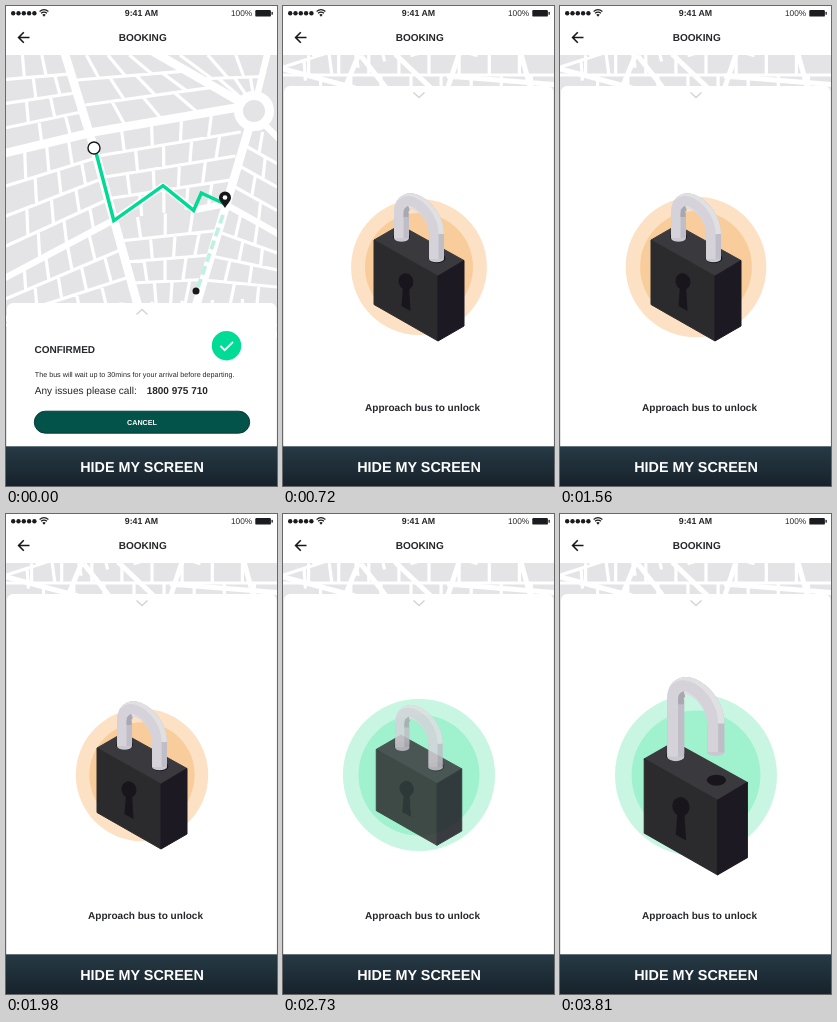
Recreate the animation shown at these times as an HTML page. Size 271 px wide and 480 px high, loop 3840 ms.

```html
<!DOCTYPE html>
<html lang="en">
<head>
<meta charset="utf-8">
<title>Booking unlock</title>
<style>
  html, body { margin: 0; width: 100%; height: 100%; overflow: hidden; background: #fff; }
  svg { display: block; width: 100vw; height: 100vh; }
  text { font-family: "Liberation Sans", Arial, sans-serif; fill: #26272b; text-rendering: geometricPrecision; }
  .b { font-weight: 700; }
  .mid { text-anchor: middle; }
  .road { fill: none; stroke: #fff; stroke-linejoin: round; }
</style>
</head>
<body>
<svg viewBox="0 0 271 480" preserveAspectRatio="none">
  <defs>
    <linearGradient id="bar" x2="0" y2="1">
      <stop stop-color="#263a45"/><stop offset="1" stop-color="#17222b"/>
    </linearGradient>
    <clipPath id="stage"><rect y="49" width="271" height="392"/></clipPath>
  </defs>
  <rect width="271" height="480" fill="#fff"/>

  <g clip-path="url(#stage)">
    <rect y="49" width="271" height="392" fill="#e4e4e7"/>
    <g id="map">
      <path id="streets" class="road" stroke-width="3.2"/>
      <path class="road" stroke-width="8.5" d="M58 45L88 142 108 214 132 300M-5 148L88 126 234 101M146 45L238 98M243 122L190 300"/>
      <path class="road" stroke-width="6.5" d="M262 45L251 90M258 118L276 136M108 214L-5 274M108 214L157 180 188 204 219 198 276 230"/>
      <circle cx="248" cy="105" r="15.5" fill="#e4e4e7" stroke="#fff" stroke-width="9"/>
      <path class="road" stroke-width="5" d="M-3 312L72 332M76 298L62 332M78 300L104 333M112 298L150 334M176 298L164 334M164 320L276 329M238 298L248 334"/>
      <path d="M217 209L191 284" fill="none" stroke="#bdf2de" stroke-width="3.8" stroke-dasharray="9 4.5"/>
      <path d="M88.8 142L107.8 214.6 157 179.6 187.6 204.4 195.3 187 219 198" fill="none" stroke="#00da95" stroke-width="3.5"/>
      <circle cx="88" cy="142" r="6" fill="#fff" stroke="#17181b" stroke-width="1.4"/>
      <circle cx="190" cy="285" r="3.5" fill="#17181b"/>
      <path d="M219 202C216 197 213 195 213 191.5A6 6 0 0 1 225 191.5C225 195 222 197 219 202Z" fill="#17181b"/>
      <circle cx="219" cy="191.5" r="2.3" fill="#fff"/>
    </g>

    <g id="sheet">
      <rect x="1" width="269.5" height="620" rx="6" fill="#fff"/>
      <path id="chevron" fill="none" stroke="#d5d5d8" stroke-width="1.6"/>
      <g id="details">
        <text class="b" x="28.5" y="50" font-size="10">CONFIRMED</text>
        <circle cx="220.5" cy="42.7" r="14.7" fill="#00dc96"/>
        <path d="M214.5 43L218.7 47.2 227 38.9" fill="none" stroke="#fff" stroke-width="1.9"/>
        <text x="28.8" y="74.3" font-size="7.18">The bus will wait up to 30mins for your arrival before departing.</text>
        <text x="28.8" y="91" font-size="10.08">Any issues please call:</text>
        <text class="b" x="140.7" y="91" font-size="10">1800 975 710</text>
        <rect x="28.3" y="108.2" width="215.4" height="22" rx="11" fill="#04534b" stroke="#03332f" stroke-width=".9"/>
        <text class="b mid" x="136" y="121.8" font-size="7.2" style="fill:#fff">CANCEL</text>
      </g>
    </g>

    <g id="content">
      <circle id="outer" cx="136" cy="261"/>
      <circle id="inner" cx="136" cy="261"/>
      <g id="lock">
        <g id="body">
          <g stroke-width="1" stroke-linejoin="round">
            <path d="M91 234L117 219 181 254.5 155 270Z" fill="#3a393d" stroke="#3a393d"/>
            <path d="M91 234L155 270V335L91 298.5Z" fill="#2b2b2d" stroke="#2b2b2d"/>
            <path d="M155 270L181 254.5V320L155 335Z" fill="#1d1922" stroke="#1d1922"/>
          </g>
          <g fill="#18161c">
            <ellipse cx="118.5" cy="231" rx="8.4" ry="4.8"/>
            <ellipse cx="154" cy="252.4" rx="8.4" ry="4.8"/>
            <path d="M120 280L118.5 300 127.5 305 126 280Z"/>
            <ellipse cx="123" cy="275.5" rx="7.4" ry="8.4" transform="rotate(-18 123 275.5)"/>
          </g>
        </g>
        <g id="shackle" fill="none">
          <ellipse cx="118.5" cy="232" rx="7.5" ry="3.8" fill="#c9c7d0"/>
          <ellipse id="foot" cx="153.5" rx="7.5" ry="3.2" fill="#c9c7d0"/>
          <path id="legs" stroke="#bfbdc7" stroke-width="15"/>
          <path id="arch" stroke="#e0dfe2" stroke-width="15"/>
          <path id="face" stroke="#d5d3d9" stroke-width="9.5" transform="translate(-2.7 0)"/>
          <path id="patch" stroke="#a9a7b0" stroke-width="5"/>
        </g>
      </g>
      <text class="b mid" x="139.5" y="404.6" font-size="10.05">Approach bus to unlock</text>
    </g>
  </g>

  <g fill="#1b1c1f">
    <g id="dots"></g>
    <path d="M38 10.8L36.3 8.7Q38 7.4 39.7 8.7Z"/>
    <path d="M35 7.2Q38 4.9 41 7.2M33.6 5.5Q38 1.9 42.4 5.5" fill="none" stroke="#1b1c1f" stroke-width="1.2"/>
    <rect x="249.3" y="4" width="15.6" height="6.6" rx="1.2"/>
    <rect x="265.5" y="5.8" width="1.3" height="3" rx=".6"/>
  </g>
  <text class="b mid" x="135.5" y="10.4" font-size="8.8">9:41 AM</text>
  <text x="225" y="10.4" font-size="8.3">100%</text>
  <path d="M23.5 31.5H12.8M17.8 26.3L12.6 31.5 17.8 36.7" fill="none" stroke="#17181b" stroke-width="1.6"/>
  <text class="b mid" x="136.7" y="34.5" font-size="10.05">BOOKING</text>

  <rect y="440.3" width="271" height="39.7" fill="url(#bar)"/>
  <text class="b mid" x="136" y="465.5" font-size="14.4" style="fill:#fff">HIDE MY SCREEN</text>
</svg>
<script>
const LOOP = 3840, PULSE = 1318;
const $ = id => document.getElementById(id);
const set = (id, attrs) => {
  for (const k in attrs) $(id).setAttribute(k, attrs[k]);
};
const lerp = (a, b, p) => a + (b - a) * p;
const ramp = (t, a, b) => Math.min(1, Math.max(0, (t - a) / (b - a)));
const smooth = p => p * p * (3 - 2 * p);
const ease = (t, a, b) => smooth(ramp(t, a, b));
const back = p => 1 + 2.2 * (p - 1) ** 3 + 1.2 * (p - 1) ** 2;
const mix = (a, b, p) => `rgb(${a.map((v, i) => Math.round(lerp(v, b[i], p)))})`;

$("dots").innerHTML = [0, 1, 2, 3, 4]
  .map(i => `<circle cx="${7.2 + i * 5.3}" cy="7.3" r="2.2"/>`).join("");

// Each district is a quad (clockwise corners) cut into blocks, rows offset like bricks.
function district([ax, ay, bx, by, cx, cy, dx, dy], cols, rows) {
  const at = (u, v) => [
    lerp(lerp(ax, bx, u), lerp(dx, cx, u), v),
    lerp(lerp(ay, by, u), lerp(dy, cy, u), v)
  ].map(n => n.toFixed(1)).join(" ");
  let d = "";
  for (let r = 0; r < rows; r++) {
    const v = r / rows, w = (r + 1) / rows;
    if (r) d += `M${at(0, v)}L${at(1, v)}`;
    for (let c = 1; c < cols; c++) {
      const u = (c + (r % 2 ? 0.25 : -0.15)) / cols;
      d += `M${at(u, v)}L${at(u, w)}`;
    }
  }
  return d;
}

set("streets", { d: [
  [[0, 49, 58, 49, 86, 124, 0, 146], 3, 4],
  [[62, 49, 148, 49, 232, 98, 88, 124], 4, 3],
  [[150, 49, 262, 49, 251, 92, 234, 97], 4, 2],
  [[0, 150, 88, 130, 108, 214, 0, 270], 4, 4],
  [[90, 128, 240, 102, 219, 198, 108, 214], 5, 4],
  [[0, 274, 108, 216, 132, 298, 0, 330], 5, 3],
  [[108, 214, 219, 200, 190, 298, 132, 298], 4, 4],
  [[246, 120, 271, 134, 271, 228, 221, 200], 2, 4],
  [[220, 202, 271, 230, 271, 298, 191, 298], 3, 4],
  [[0, 300, 271, 292, 271, 346, 0, 338], 9, 2]
].map(a => district(...a)).join("") });

function drawSheet(t) {
  const p = 1.125 * ease(t, 0, 320) - 0.125 * ease(t, 340, 660);
  const top = lerp(297, 80, p);
  const tip = lerp(-2.5, 2.5, ease(t, 80, 280));
  set("map", { transform: `translate(0 ${-250 * p})` });
  set("sheet", { transform: `translate(0 ${top})` });
  set("chevron", { d: `M130.5 ${9 - tip}L136 ${9 + tip} 141.5 ${9 - tip}` });
  set("details", { opacity: 1 - ease(t, 30, 200) });
  set("content", {
    transform: `translate(0 ${(top - 80) / 2})`,
    opacity: ease(t, 120, 480)
  });
}

function drawPulse(t) {
  const early = 5 * (1 - ease(t, 360, 600));
  const r = 72.6 + 8.4 * Math.cos((t - 1174) / PULSE * 2 * Math.PI) + early;
  const green = ease(t, 2420, 2680);
  set("outer", { r, fill: mix([253, 225, 196], [200, 246, 226], green) });
  set("inner", { r: r * 0.795, fill: mix([248, 205, 155], [160, 241, 205], green) });
}

// The left leg stays in the body while the arch rises.
function drawShackle(lift) {
  const y = n => n - lift;
  const curve = `${y(207)}C118.5 ${y(181)} 153.5 ${y(201)} 153.5 ${y(228)}`;
  const whole = `M118.5 232V${curve}V${y(253)}`;
  set("legs", { d: whole });
  set("face", { d: whole });
  set("arch", { d: `M118.5 ${curve}` });
  set("foot", { cy: y(253) });
  set("patch", { d: `M123 ${y(211)}V${y(206)}Q123 ${y(203)} 126 ${y(202)}` });
}

function drawLock(t) {
  const open = back(ramp(t, 2740, 3080));
  const scale = lerp(lerp(1, 0.95, ease(t, 2560, 2720)), 1.145, open);
  const cy = lerp(261, 276, open);
  const alpha = 1 - 0.16 * ease(t, 2580, 2720) * (1 - ease(t, 2745, 2860));
  set("lock", {
    transform: `translate(${lerp(136, 135.8, open)} ${cy}) scale(${scale}) translate(-136 -261)`
  });
  set("body", { opacity: alpha });
  set("shackle", { opacity: alpha });
  drawShackle(25 * open);
}

function draw(t) {
  drawSheet(t);
  drawPulse(t);
  drawLock(t);
}

const start = performance.now();
function tick() {
  draw((performance.now() - start) % LOOP);
  requestAnimationFrame(tick);
}
tick();
</script>
</body>
</html>
```
